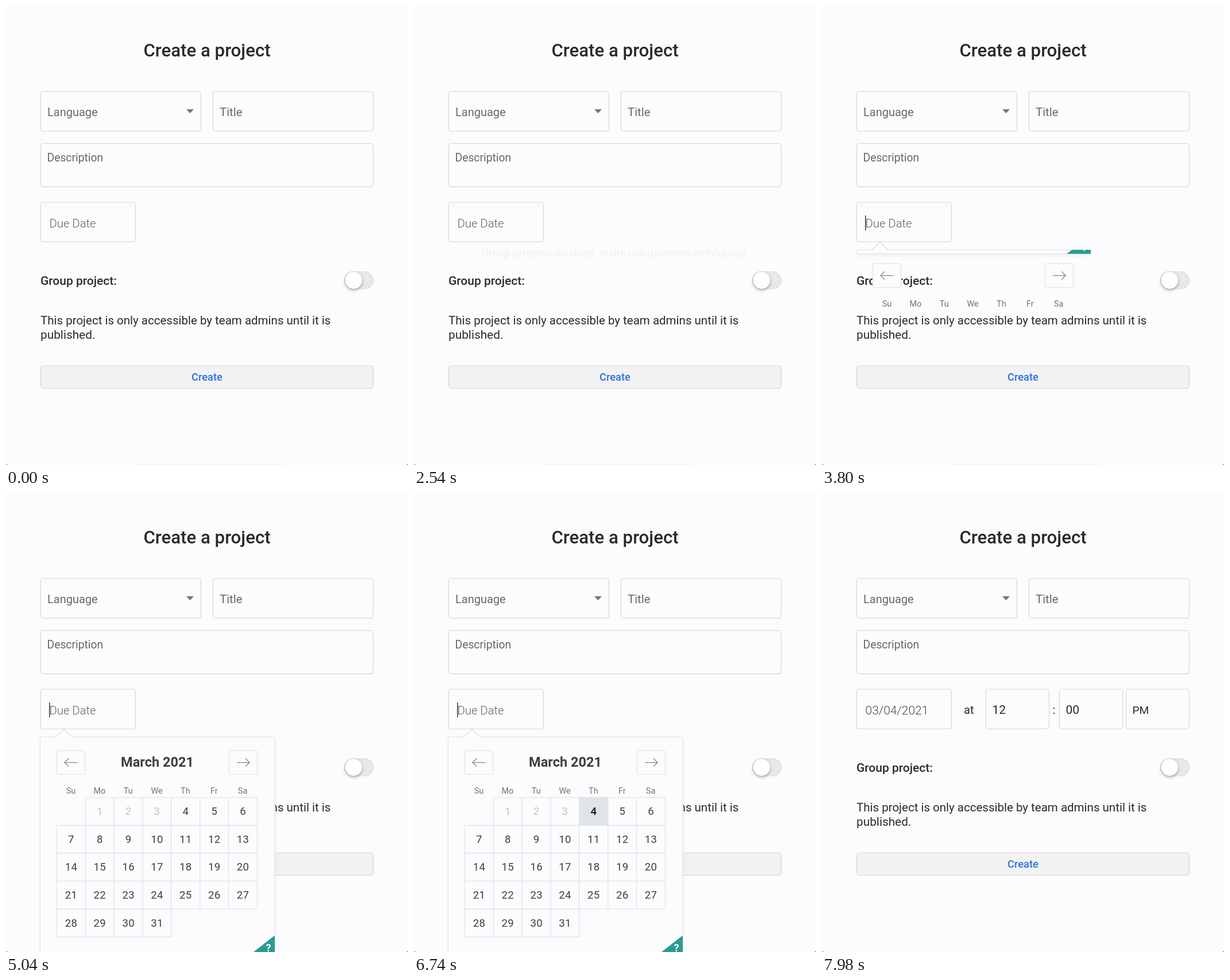
Recreate the animation shown at these times as an HTML page with a canvas. Size 700 by 800 pixels, loop 8000 ms.

```html
<!DOCTYPE html>
<html lang="en">
<head>
<meta charset="utf-8">
<title>Create a project</title>
<style>
html, body { margin: 0; width: 100%; height: 100%; overflow: hidden; background: #fcfcfe; }
canvas { display: block; width: 700px; height: 800px; }
</style>
</head>
<body>
<canvas id="stage" width="700" height="800"></canvas>
<script>
const ctx = document.getElementById('stage').getContext('2d');
const LOOP = 8000;
const BG = '#fcfcfe', INK = '#2a2a2c', GRAY = '#686866', LINE = '#d6d6d6', GRID = '#dee1ea';

const between = (t, a, b) => t >= a && t < b;
const progress = (t, a, b) => Math.min(1, Math.max(0, (t - a) / (b - a)));
const easeInOut = p => p * p * (3 - 2 * p);

function text(str, x, y, size, { weight = 400, color = INK, align = 'left', spacing = 0 } = {}) {
  ctx.font = `${weight} ${size}px Roboto, "Open Sans", sans-serif`;
  ctx.letterSpacing = spacing + 'px';
  ctx.textAlign = align;
  ctx.fillStyle = color;
  ctx.fillText(str, x, y);
}

function box(x, y, w, h, r, stroke, fill) {
  ctx.beginPath();
  ctx.roundRect(x, y, w, h, r);
  if (fill) { ctx.fillStyle = fill; ctx.fill(); }
  if (stroke) { ctx.strokeStyle = stroke; ctx.lineWidth = 1.2; ctx.stroke(); }
}

function path(points, stroke, fill, width = 1) {
  ctx.beginPath();
  points.forEach(([x, y], i) => i ? ctx.lineTo(x, y) : ctx.moveTo(x, y));
  if (fill) { ctx.fillStyle = fill; ctx.fill(); }
  if (stroke) { ctx.strokeStyle = stroke; ctx.lineWidth = width; ctx.stroke(); }
}

const field = (x, y, w, h) => box(x, y, w, h, 4, LINE);

function drawToggle() {
  box(589.5, 463, 50, 30, 15, '#dcdcde', '#e8e8ea');
  ctx.save();
  ctx.shadowColor = 'rgba(0,0,0,.35)';
  ctx.shadowBlur = 5;
  ctx.shadowOffsetY = 2;
  box(590.5, 463.5, 29.5, 29.5, 14.75, null, '#fefefe');
  ctx.restore();
}

function drawForm() {
  text('Create a project', 350, 88, 31.2, { weight: 500, align: 'center' });

  field(60.5, 149, 279, 69);
  text('Language', 72, 192, 20, { color: GRAY });
  path([[314, 180], [327, 180], [320.5, 187]], null, '#757575');
  field(360.5, 149, 279, 69);
  text('Title', 372, 192, 20.4, { color: GRAY });
  field(60.5, 239.5, 579, 75.7);
  text('Description', 71.5, 271, 19.3, { color: GRAY });
  field(60.5, 342, 165, 69);

  text('Group project:', 60, 486, 21, { weight: 500 });
  drawToggle();
  text('This project is only accessible by team admins until it is', 60, 555, 20.5);
  text('published.', 60, 580, 20.8);

  box(60.5, 627, 579, 39.5, 5, '#d8d8da', '#f2f2f3');
  text('Create', 350, 653, 18.3, { weight: 500, color: '#2a74dd', align: 'center' });

  ctx.fillStyle = '#f5f5f7';
  ctx.fillRect(225, 799, 260, 1);
  ctx.fillStyle = '#55555a';
  ctx.fillRect(0, 799, 2, 1);
  ctx.fillRect(698, 799, 2, 1);
}

function drawTime() {
  text('03/04/2021', 75.5, 386, 21, { weight: 300, color: '#48484a' });
  text('at', 247, 385, 20);
  for (const [x, str, size] of [[285.5, '12', 21], [413.5, '00', 21], [529.5, 'PM', 19.2]]) {
    field(x, 342, 110, 69);
    text(str, x + 11, 385, size);
  }
  text(':', 404, 385, 20.5, { align: 'center' });
}

function drawNav(x, dir) {
  box(x, 449, 49, 41.5, 3, '#dfe2e6', BG);
  const cx = x + 24.5, cy = 469.8, tip = cx + dir * 11;
  path([[cx - dir * 11, cy], [tip, cy]], '#82888a', null, 1.3);
  path([[tip - dir * 7, cy - 7], [tip, cy], [tip - dir * 7, cy + 7]], '#82888a', null, 1.3);
}

function drawDays(hovered) {
  const w = 49.85, h = 48.6;
  for (let day = 1; day <= 31; day++) {
    const x = 88.5 + day % 7 * w, y = 530.7 + Math.floor(day / 7) * h;
    const hot = day === hovered;
    ctx.fillStyle = hot ? '#dfe4e6' : BG;
    ctx.fillRect(x, y, w, h);
    ctx.strokeStyle = GRID;
    ctx.lineWidth = 1.1;
    ctx.strokeRect(x, y, w, h);
    text(day, x + w / 2, y + 30.5, 18.6, {
      color: hot ? '#111' : day < 4 ? '#c2c4c5' : '#3c3f40',
      weight: hot ? 500 : 400, align: 'center', spacing: 0.3
    });
  }
}

function drawPicker(height, hovered) {
  ctx.save();
  ctx.shadowColor = 'rgba(0,0,0,.06)';
  ctx.shadowBlur = 7;
  ctx.shadowOffsetY = 3;
  box(59.5, 425, 408.5, height, 3, null, BG);
  ctx.restore();
  box(59.5, 425, 408.5, height, 3, '#e3e4e8');

  ctx.save();
  ctx.beginPath();
  ctx.rect(60, 425, 408, height);
  ctx.clip();
  text('March 2021', 263.5, 477, 23.5, { weight: 700, color: '#3c3f40', align: 'center' });
  drawDays(hovered);
  const bottom = 425 + height;
  path([[426, bottom], [468, bottom - 33], [468, bottom]], null, '#2a9d93');
  text('?', 457, bottom - 5, 17.5, { weight: 700, color: '#fff', align: 'center' });
  ctx.restore();

  drawNav(88.5, -1);
  drawNav(388.5, 1);
  'Su Mo Tu We Th Fr Sa'.split(' ').forEach((name, i) =>
    text(name, 113 + i * 49.85, 524, 14.5, { color: '#707374', align: 'center' }));
}

function draw(t) {
  ctx.fillStyle = BG;
  ctx.fillRect(0, 0, 700, 800);
  drawForm();

  if (between(t, 2540, 2960)) {
    ctx.globalAlpha = 0.06 * (1 - progress(t, 2640, 2960));
    text('Group projects disabled. Invite collaborators individually.', 350, 437, 18.6, { align: 'center' });
    ctx.globalAlpha = 1;
  }

  if (t >= 7900) return drawTime();

  text('Due Date', 75.5, 386, 20.3, { weight: 300, color: '#636363' });
  const open = t >= 3660;
  if (!open) return;

  if (t >= 3800) {
    const hovered = t >= 6740 ? 4 : t >= 6000 ? 11 : 0;
    drawPicker(379 * easeInOut(progress(t, 3780, 4040)), hovered);
  }
  path([[88, 424], [101, 411.8], [114, 424]], '#d9dadd', BG, 1.1);
  if (t >= 3800) {
    ctx.fillStyle = BG;
    ctx.fillRect(89, 424, 24, 2);
  }

  const caret = between(t, 3660, 4620) || between(t, 4840, 5580) || between(t, 6440, 7300);
  if (caret) {
    ctx.fillStyle = '#3a3a3c';
    ctx.fillRect(75, 365, 1.5, 26);
  }
}

const start = performance.now();
function tick() {
  draw((performance.now() - start) % LOOP);
  requestAnimationFrame(tick);
}
tick();
</script>
</body>
</html>
```
